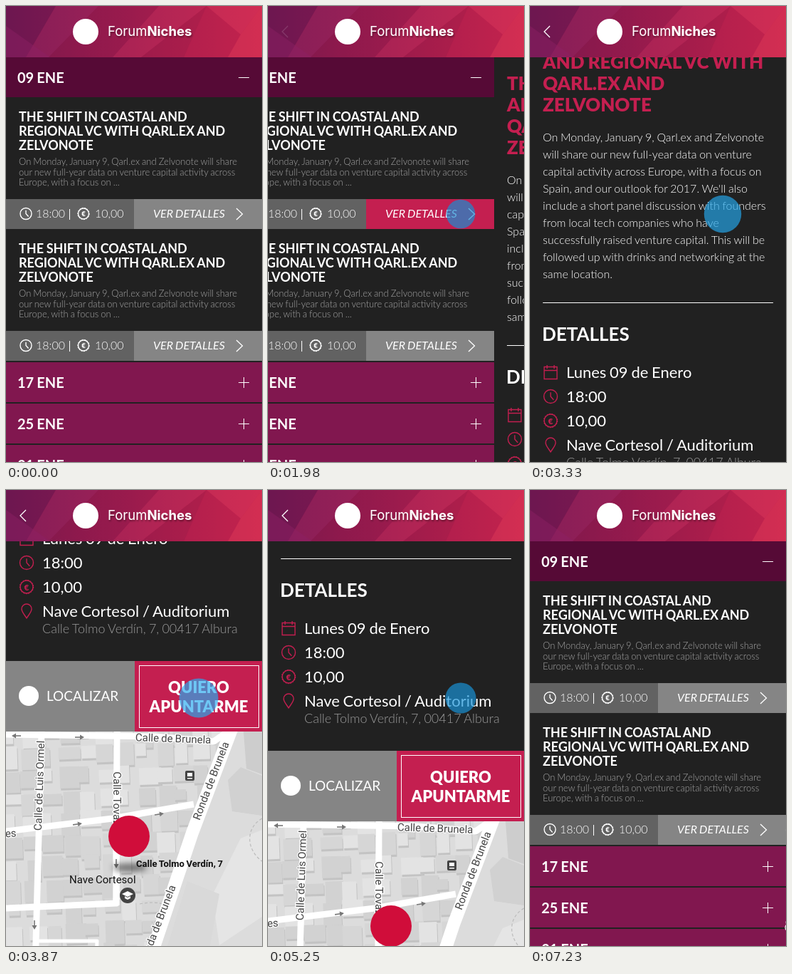
Animation, 360 px wide and 640 px high, one loop 8000 ms. Source, as an HTML page:

```html
<!DOCTYPE html>
<html lang="es">
<head>
<meta charset="utf-8">
<title>Agenda</title>
<style>
  html, body { margin: 0; width: 100%; height: 100%; overflow: hidden; background: #212121; }
  svg { display: block; width: 360px; height: 640px; font-family: Lato, sans-serif; }
  .brand { font-family: Inter, sans-serif; }
  .map text { font-family: Roboto, sans-serif; }
  text { white-space: pre; word-spacing: -.04em; }
</style>
</head>
<body>
<svg id="stage" viewBox="0 0 360 640" xmlns="http://www.w3.org/2000/svg"></svg>
<script>
const PINK = '#c41f50', GREY = '#858585', DARK = '#212121';

// Markup helpers
const rect = (x, y, w, h, fill, extra = '') =>
  `<rect x="${x}" y="${y}" width="${w}" height="${h}" fill="${fill}" ${extra}/>`;
const poly = (points, fill, extra = '') => `<polygon points="${points}" fill="${fill}" ${extra}/>`;
const line = (d, color, width = 1, extra = '') =>
  `<path d="${d}" fill="none" stroke="${color}" stroke-width="${width}" ${extra}/>`;
const disc = (x, y, r, fill, extra = '') => `<circle cx="${x}" cy="${y}" r="${r}" fill="${fill}" ${extra}/>`;
const text = (x, y, size, weight, fill, str, extra = '') =>
  `<text x="${x}" y="${y}" font-size="${size}" font-weight="${weight}" fill="${fill}" ${extra}>${str}</text>`;
const lines = (x, y, pitch, size, weight, fill, rows, extra) =>
  rows.map((row, i) => text(x, y + i * pitch, size, weight, fill, row, extra)).join('');
const at = (x, y, body, more = '') => `<g transform="translate(${x} ${y}) ${more}">${body}</g>`;

// Icons, centred on the origin
const clock = (r, color) => disc(0, 0, r, 'none', `stroke="${color}" stroke-width="1.4"`) +
  line(`M0 ${-r * .6}V0L${r * .45} ${r * .5}`, color, 1.4);
const euro = (r, color) =>
  disc(0, 0, r, 'none', `stroke="${color}" stroke-width="1.4"`) +
  disc(0, 0, r + .7, 'none', `stroke="${color}" stroke-width="1" stroke-dasharray="2 1.6"`) +
  text(0, r * .5, r * 1.3, 900, color, '€', 'text-anchor="middle"');
const calendar = color => line('M-9 -7.500H9V9.500H-9ZM-9 -2.500H9M-5 -10V-5M5 -10V-5', color, 1.4);
const marker = color => line('M0 10C-3 5 -7 1 -7 -3A7 7 0 0 1 7 -3C7 1 3 5 0 10Z', color, 1.4);

function header() {
  const facets = [
    ['0,0 70,0 28,72 0,72', '#5d1450', .35], ['70,0 130,0 60,72 28,72', '#9d2a66', .35],
    ['0,28 62,72 0,72', '#8d2065', .45], ['130,0 215,0 150,72 60,72', '#8a1546', .25],
    ['215,0 282,0 190,72 150,72', '#c32f5c', .35], ['190,72 282,0 250,72', '#94163f', .3],
    ['282,0 360,0 330,40', '#d6365a', .4], ['250,72 282,0 330,40 312,72', '#b51c49', .4],
    ['312,72 330,40 360,0 360,72', '#e03a57', .35]
  ];
  return rect(0, 0, 360, 72, 'url(#head)') +
    facets.map(([points, fill, alpha]) => poly(points, fill, `opacity="${alpha}"`)).join('') +
    disc(112, 36, 18, '#fff') +
    `<g class="brand" filter="url(#drop)">` +
    `<text x="143" y="42" font-size="18.500" fill="#fff">Forum<tspan font-weight="700">Niches</tspan></text></g>` +
    `<g id="back">${line('M28 28L20 36L28 44', '#fff', 1.3)}</g>`;
}

function card(y, id) {
  return at(0, y,
    lines(18, 34, 20, 18, 700, '#fff',
      ['THE SHIFT IN COASTAL AND', 'REGIONAL VC WITH QARL.EX AND', 'ZELVONOTE']) +
    lines(18, 95, 14.5, 13, 300, '#a4a4a4',
      ['On Monday, January 9, Qarl.ex and Zelvonote will share',
       'our new full-year data on venture capital activity across',
       'Europe, with a focus on ...']) +
    rect(0, 143, 180, 42, '#626262') + rect(180, 143, 180, 42, GREY, `id="${id}"`) +
    at(28, 163.5, clock(8, '#fff')) + text(42, 169, 16, 300, '#fff', '18:00') +
    line('M89.500 157V172', '#fff') +
    at(109, 163.5, euro(7.5, '#fff')) + text(125, 169, 16, 300, '#fff', '10,00') +
    text(207, 169, 16, 400, '#fff', 'VER DETALLES', 'font-style="italic"') +
    line('M324 156L332.500 164L324 172', '#fff', 1.3));
}

function list() {
  const row = (y, day) => rect(0, y, 360, 56, '#81174f') + text(16, y + 36, 20, 700, '#fff', day + ' ENE') +
    line(`M327 ${y + 28.5}H342M334.500 ${y + 21}V${y + 36}`, '#fff');
  return rect(0, 72, 360, 568, DARK) + rect(0, 72, 360, 56, '#560a36') +
    text(16, 108, 20, 700, '#fff', '09 ENE') + line('M327 100.500H342', '#fff') +
    card(128, 'choice') + card(313, 'other') +
    row(500, 17) + row(558, 25) + row(616, 31);
}

// Irregular blocks, each with a darker lower edge
function buildings() {
  let seed = 41, out = '';
  const rnd = () => (seed = seed * 16807 % 2147483647) / 2147483647;
  const tones = ['#d2d2d2', '#d6d6d6', '#e3e3e3'];
  for (let y = -10; y < 420; y += 31) {
    for (let x = -10; x < 330; x += 27) {
      const w = 14 + rnd() * 18, h = 14 + rnd() * 20, tone = tones[Math.floor(rnd() * 3)];
      const left = x + rnd() * 7, top = y + rnd() * 7;
      out += rect(left + 1, top + 3, w, h, '#c3c3c3') + rect(left, top, w, h, tone);
    }
  }
  return `<g clip-path="url(#town)"><g transform="rotate(-2)">${out}</g></g>`;
}

function map() {
  const label = (x, y, angle, str, size = 15) =>
    at(x, y, text(0, 0, size, 400, '#444', str,
      'text-anchor="middle" stroke="#fff" stroke-width="2.500" paint-order="stroke"'), `rotate(${angle})`);
  const arrow = (x, y, angle) =>
    at(x, y, line('M-6 0H2', '#777', 1.6) + poly('1,-3.500 7,0 1,3.500', '#777'), `rotate(${angle})`);
  const roads = [
    ['M0 4L210 7L292 14L318 -4', 9], ['M50 0L39 408', 9], ['M156 0L155 244', 9],
    ['M0 140L150 122L264 102', 9], ['M0 248L155 241L155 130', 9], ['M40 294H128L124 408', 5],
    ['M324 -20L316 0L262 142L196 338L170 410', 18]
  ];
  return rect(0, 0, 360, 420, '#dcdcdc') + buildings() +
    poly('334,0 360,0 360,60 338,52', '#cdcdcd') + poly('312,68 330,50 360,62 360,118 318,112', '#d1d1d1') +
    poly('330,150 360,138 360,260 300,300 290,230', '#e5e5e5') +
    poly('255,210 300,228 280,340 215,340', '#d9d9d9') +
    line('M360 122C336 136 338 166 360 182M188 242C240 232 230 262 205 268', '#bbb', 1.2, 'stroke-dasharray="4 3"') +
    roads.map(([d, w]) => line(d, '#fff', w, 'stroke-linejoin="round"')).join('') +
    arrow(15, 6, 180) + arrow(103, 8, 0) + arrow(100, 130, -8) + arrow(215, 116, -9) +
    arrow(40, 271, 90) + arrow(155, 185, 90) +
    label(235, 15, 2, 'Calle de Brunela') + label(52, 76, -88, 'Calle de Luis Ormel') +
    label(43, 322, -88, 'Ormel') + label(151, 94, 90, 'Calle Tovaz') +
    label(7, 148, -4, 'es') + label(293, 71, -69, 'Ronda de Brunela') + label(218, 272, -69, 'Ronda de Brunela') +
    rect(252, 55, 13, 14, '#444', 'rx="2"') + rect(255, 58, 7, 5, '#fff') + rect(255, 65, 7, 1.5, '#fff') +
    disc(171, 230, 11, '#444') + poly('163,228 171,224 179,228 171,232', '#fff') +
    poly('167,231 171,233 175,231 175,234 171,236 167,234', '#fff') +
    `<ellipse cx="174" cy="191" rx="24" ry="6" fill="#000" opacity=".5" filter="url(#soft)"/>` +
    disc(173, 147, 29, '#d00d3a') +
    text(183, 190, 13, 700, '#111', 'Calle Tolmo Verdín, 7') +
    text(89, 213, 15, 400, '#111', 'Nave Cortesol');
}

function detail() {
  const item = (y, icon, str) => at(29, y - 8, icon) + text(51, y, 22, 400, '#fff', str);
  return rect(0, 0, 360, 1300, DARK) +
    `<g class="map">${at(0, 845, map())}</g>` +
    lines(18, 118, 30, 26, 900, PINK,
      ['THE SHIFT IN COASTAL', 'AND REGIONAL VC WITH', 'QARL.EX AND', 'ZELVONOTE']) +
    lines(18, 250, 24, 16, 300, '#fff',
      ['On Monday, January 9, Qarl.ex and Zelvonote',
       'will share our new full-year data on venture',
       'capital activity across Europe, with a focus on',
       "Spain, and our outlook for 2017. We'll also",
       'include a short panel discussion with founders',
       'from local tech companies who have',
       'successfully raised venture capital. This will be',
       'followed up with drinks and networking at the',
       'same location.']) +
    line('M18 476.500H342', '#fff') + text(17, 530, 26, 700, '#fff', 'DETALLES') +
    item(582, calendar(PINK), 'Lunes 09 de Enero') + item(616, clock(9.5, PINK), '18:00') +
    item(650, euro(9, PINK), '10,00') + item(684, marker(PINK), 'Nave Cortesol / Auditorium') +
    text(51, 707, 18, 300, '#999', 'Calle Tolmo Verdín, 7, 00417 Albura') +
    rect(0, 746, 181, 99, GREY) + disc(32, 795, 14, '#fff') + text(57, 802, 19, 400, '#fff', 'LOCALIZAR') +
    rect(181, 746, 179, 99, PINK) + rect(187.5, 752.5, 168, 87, 'none', 'stroke="#fff"') +
    lines(271, 791, 27, 22, 900, '#fff', ['QUIERO', 'APUNTARME'], 'text-anchor="middle"');
}

const stage = document.getElementById('stage');
stage.innerHTML = `<defs>
  <linearGradient id="head"><stop stop-color="#76184f"/><stop offset=".5" stop-color="#a01d50"/>
    <stop offset="1" stop-color="#cc2850"/></linearGradient>
  <filter id="drop"><feDropShadow dx="1" dy="2" stdDeviation="1" flood-opacity=".4"/></filter>
  <filter id="soft" x="-50%" y="-100%" width="200%" height="300%"><feGaussianBlur stdDeviation="4"/></filter>
  <clipPath id="town"><polygon points="0,0 318,0 196,338 166,420 0,420"/></clipPath></defs>
  <g id="list">${list()}</g><g id="detail">${detail()}</g>${header()}
  ${disc(0, 0, 20, '#1491d7', 'id="touch"')}`;

const el = id => document.getElementById(id);
const parts = { list: el('list'), detail: el('detail'), back: el('back'), touch: el('touch'), choice: el('choice') };

const LOOP = 8000, TICK = 30;
const ease = (t, from, to) => {
  const u = Math.min(1, Math.max(0, (t - from) / (to - from)));
  return u * u * (3 - 2 * u);
};
const curve = (a, b, c, u) => (1 - u) * (1 - u) * a + 2 * u * (1 - u) * b + u * u * c;
const blend = (a, b, u) => `rgb(${a.map((v, i) => Math.round(v + (b[i] - v) * u))})`;

function touchPoint(t) {
  if (t < 5700) {
    const u = ease(t, 510, 1080);
    return [curve(385, 320, 271, u), curve(231, 255, 292, u)];
  }
  const u = ease(t, 5700, 6270);
  return [curve(271, 125, 26, u), curve(292, -17, 36, u)];
}

function draw(t) {
  const slide = ease(t, 1782, 2708) - ease(t, 6270, 7230);
  const scroll = 618 * ease(t, 3136, 4144) - 243 * ease(t, 4495, 5320);
  const shift = Math.round(360 * slide);
  parts.list.setAttribute('transform', `translate(${-shift} 0)`);
  parts.detail.setAttribute('transform', `translate(${360 - shift} ${-Math.round(scroll)})`);
  parts.back.setAttribute('opacity', ease(t, 1782, 2600) - ease(t, 6000, 6270));

  const press = ease(t, 900, 1345) - ease(t, 6300, 7230);
  parts.choice.setAttribute('fill', blend([133, 133, 133], [196, 31, 80], press));

  // The touch dot swells and brightens while dragging
  const drag = ease(t, 3136, 3400) - ease(t, 5060, 5320);
  const [x, y] = touchPoint(t);
  parts.touch.setAttribute('cx', x.toFixed(1));
  parts.touch.setAttribute('cy', y.toFixed(1));
  parts.touch.setAttribute('r', 20.3 + 7.2 * drag);
  parts.touch.setAttribute('fill', blend([20, 145, 215], [40, 172, 240], drag));
  parts.touch.setAttribute('opacity', t < 540 ? 0 : .67 * (1 - ease(t, 6480, 7000)));
}

const start = performance.now();
function frame() {
  const t = (performance.now() - start) % LOOP;
  draw(Math.floor(t / TICK) * TICK);
  requestAnimationFrame(frame);
}
frame();
</script>
</body>
</html>
```
